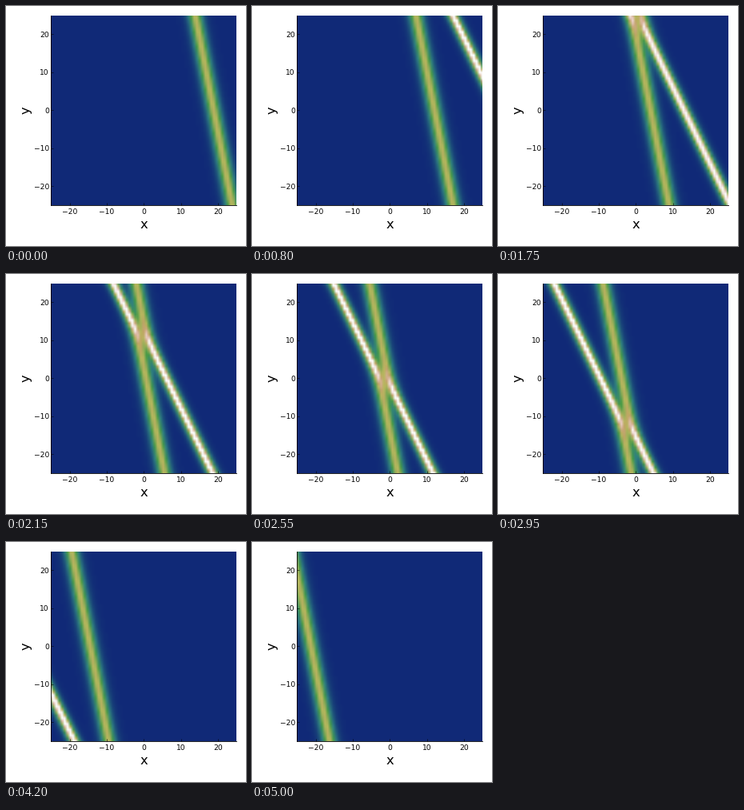
A matplotlib script for the animation above (5.05 s loop, 300x300 px).

```python
import numpy as np
import matplotlib.pyplot as plt
from matplotlib.animation import FuncAnimation

SIZE, DPI = 300, 100
FRAMES, INTERVAL = 101, 50
HALF = 25          # the plane covers -HALF..HALF on both axes
POINTS = 67
LEFT, RIGHT, TOP, BOTTOM = 56.4, 288, 11.6, 249.2   # plot area in pixels

# Two line solitons: wave number, tilt dx/dy, drift per frame, start offset
K1, TILT1, DRIFT1, OFFSET1 = 1.35, 0.2, 0.4245, 0.02
K2, TILT2, DRIFT2, OFFSET2 = 1.76, 0.5, 0.865, 0.06
LOG_A = -3.2       # interaction term, sets the phase shift

plt.rcParams["font.family"] = "DejaVu Sans"

grid = np.linspace(-HALF, HALF, POINTS)
X, Y = np.meshgrid(grid, grid)


def wave(frame):
    """u = 2 (ln tau)_xx with tau = A + e^p + e^q + e^(p+q)."""
    m = FRAMES // 2 - frame
    p = K1 * (X + TILT1 * Y - DRIFT1 * m - OFFSET1)
    q = K2 * (X + TILT2 * Y - DRIFT2 * m - OFFSET2)
    terms = np.stack([np.full_like(p, LOG_A), p, q, p + q])
    weights = np.exp(terms - terms.max(axis=0))
    weights /= weights.sum(axis=0)
    slopes = np.array([0, K1, K2, K1 + K2])[:, None, None]
    mean = (weights * slopes).sum(axis=0)
    return 2 * (weights * (slopes - mean) ** 2).sum(axis=0)


def px(value):
    return value / SIZE


fig = plt.figure(figsize=(SIZE / DPI, SIZE / DPI), dpi=DPI, facecolor="white")
ax = fig.add_axes([px(LEFT), px(SIZE - BOTTOM), px(RIGHT - LEFT), px(BOTTOM - TOP)])

edge = HALF + (grid[1] - grid[0]) / 2
image = ax.imshow(wave(0), origin="lower", extent=(-edge, edge, -edge, edge),
                  aspect="auto", cmap="gist_earth", vmin=-0.146, vmax=1.32,
                  interpolation="bilinear", interpolation_stage="rgba")
ax.set_xlim(-HALF, HALF)
ax.set_ylim(-HALF, HALF)

ticks = range(-20, 21, 10)
ax.set_xticks(ticks)
ax.set_yticks(ticks)
ax.tick_params(direction="in", length=2.5, width=0.4, labelsize=6.6)
ax.tick_params(axis="x", pad=2.8)
ax.tick_params(axis="y", pad=1.7)
for side in ("left", "bottom"):
    ax.spines[side].set_linewidth(0.6)
for side in ("right", "top"):
    ax.spines[side].set_visible(False)

fig.text(px((LEFT + RIGHT) / 2), px(22), "x", fontsize=11.8,
         ha="center", va="baseline")
fig.text(px(24.6), 1 - px((TOP + BOTTOM) / 2), "y", fontsize=11.8, rotation=90,
         ha="center", va="center")


def draw(frame):
    image.set_data(wave(frame))
    return (image,)


anim = FuncAnimation(fig, draw, frames=FRAMES, interval=INTERVAL,
                     repeat=True, repeat_delay=0, blit=False)
plt.show()
```
